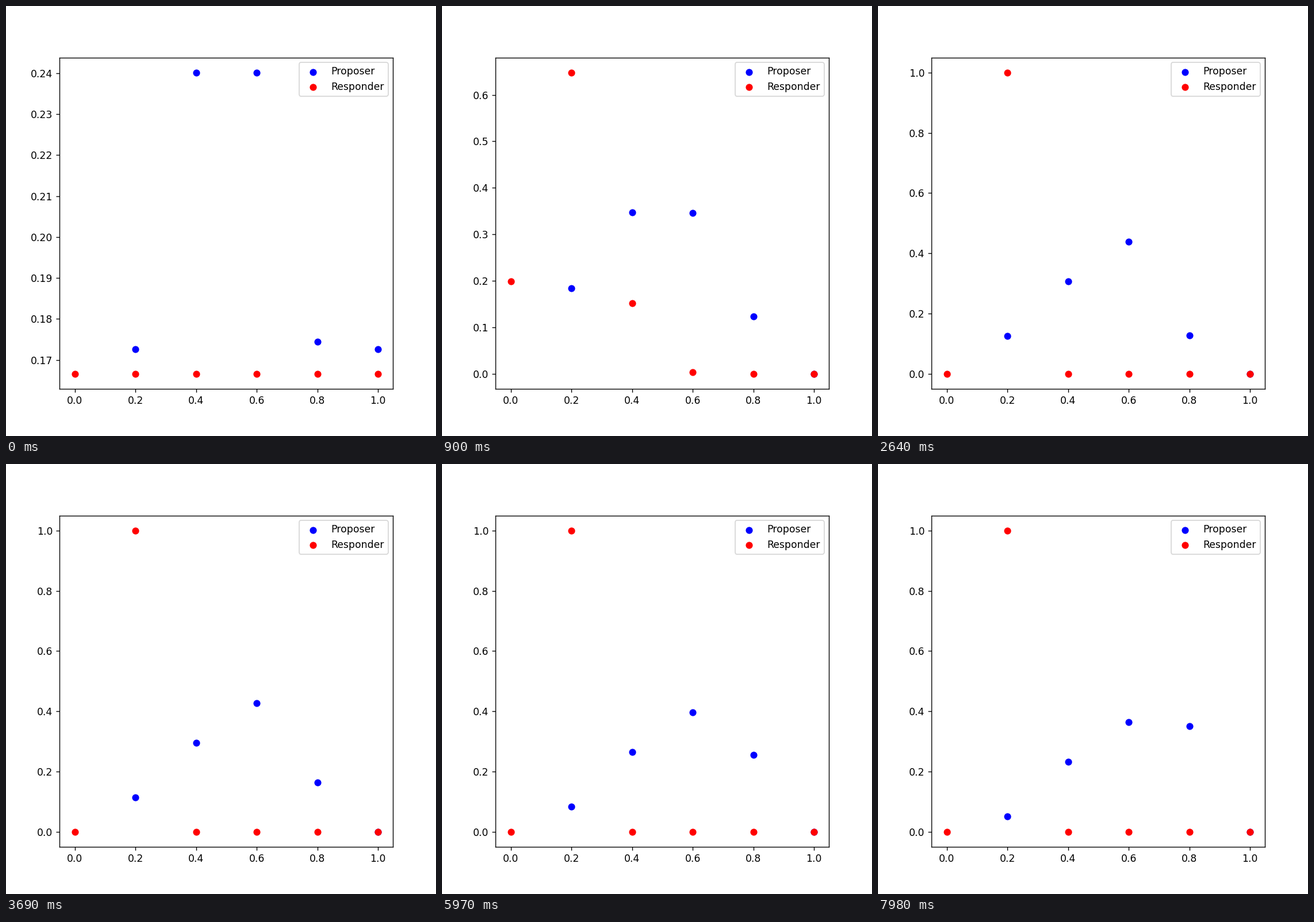
Recreate the animation shown at these times as a matplotlib script. Size 748 by 748 pixels, loop 8000 ms.

```python
import numpy as np
import matplotlib.pyplot as plt
from matplotlib.animation import FuncAnimation

SIZE, INCHES = 748, 6
LOOP_MS, TICK_MS, STEP_MS = 8000, 20, 30

OFFERS = np.linspace(0.2, 1.0, 5)
REPLIES = np.linspace(0.0, 1.0, 6)

# Step: action shares at each turning point of the learning.
TURN = 52
PROPOSER = {
    0: (.1726, .2401, .2401, .1744, .1726),
    19: (.207, .361, .293, .139, 0),
    TURN: (.137, .318, .4505, .0925, 0),
}
RESPONDER = {
    0: np.full(6, 1 / 6),
    15: (.175, .506, .313, .006, 0, 0),
    44: (.22, .78, 0, 0, 0, 0),
    76: (0, 1, 0, 0, 0, 0),
}
# After the turn, 0.8 takes an equal share from each rival.
DRIFT = np.array([-1, -1, -1, 3, 0])


def glide(step, keys):
    return np.array([np.interp(step, list(keys), track)
                     for track in zip(*keys.values())])


def offer_shares(step):
    late = max(step - TURN, 0)
    return glide(step, PROPOSER) + DRIFT * (2.94e-4 * late + 5e-7 * late ** 2)


fig, ax = plt.subplots(figsize=(INCHES, INCHES), dpi=SIZE / INCHES)
fig.subplots_adjust(left=0.1249, right=0.9002)
proposer = ax.scatter(OFFERS, OFFERS, color="blue", label="Proposer")
responder = ax.scatter(REPLIES, REPLIES, color="red", label="Responder")
ax.legend(loc="upper right")
ax.set_xlim(-0.05, 1.05)


def update(frame):
    step = (frame * TICK_MS + STEP_MS // 3) // STEP_MS
    offers, replies = offer_shares(step), glide(step, RESPONDER)
    proposer.set_offsets(np.column_stack([OFFERS, offers]))
    responder.set_offsets(np.column_stack([REPLIES, replies]))

    shares = np.concatenate([offers, replies])
    margin = 0.05 * np.ptp(shares)
    ax.set_ylim(shares.min() - margin, shares.max() + margin)
    return proposer, responder


anim = FuncAnimation(fig, update, frames=LOOP_MS // TICK_MS, interval=TICK_MS,
                     init_func=lambda: update(0), repeat=True, repeat_delay=0)
plt.show()
```
